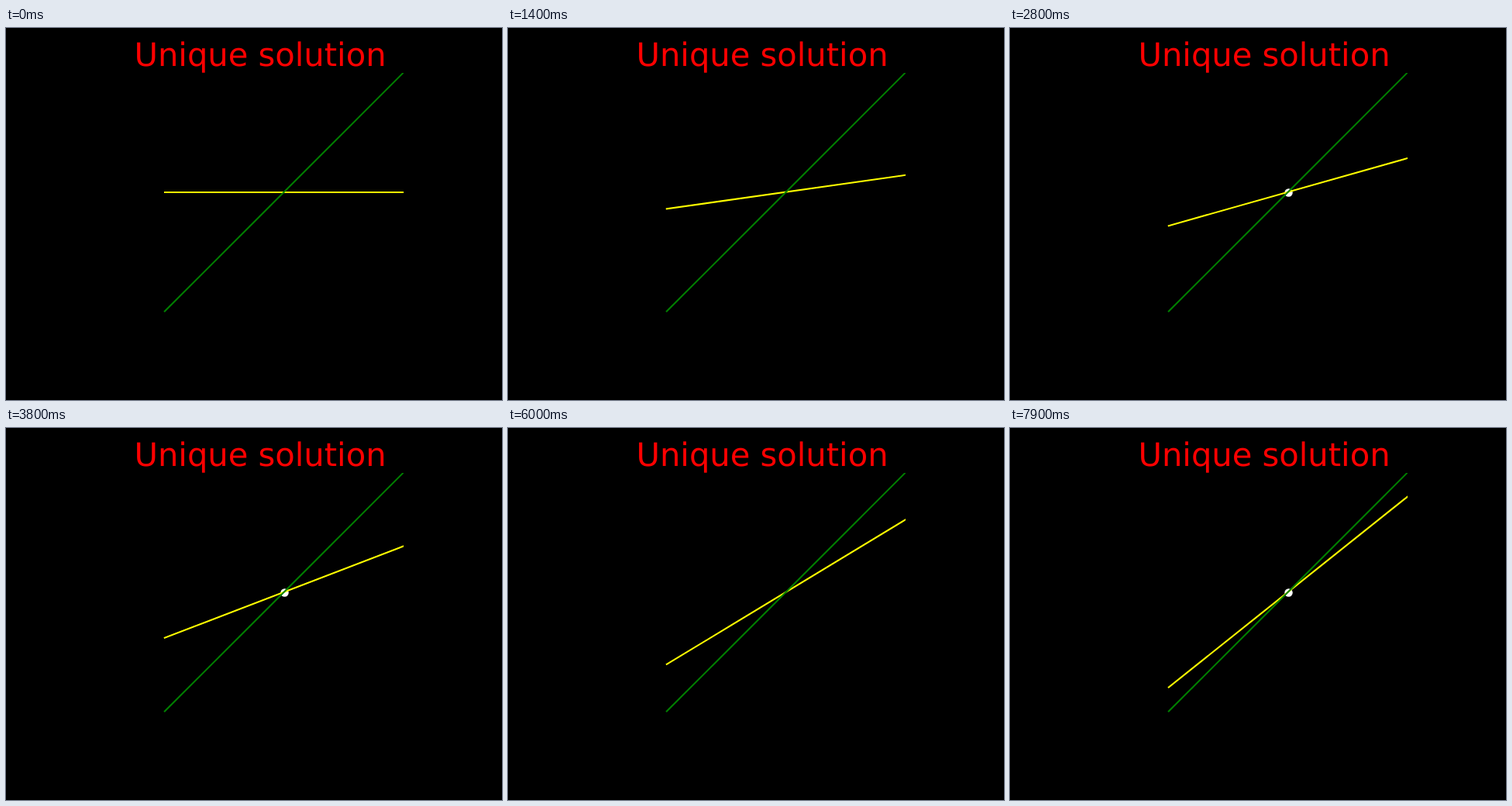
These frames come from a looping animation (640 by 480 pixels, 8000 ms). An HTML page:

```html
<!DOCTYPE html>
<html lang="en">
<head>
<meta charset="utf-8">
<title>Unique solution</title>
<style>
  html, body { margin: 0; width: 100%; height: 100%; overflow: hidden; background: #000; }
  svg { display: block; width: 640px; height: 480px; }
  text { font: 41.667px "DejaVu Sans", sans-serif; fill: #f00; text-anchor: middle; text-rendering: geometricPrecision; }
  line { stroke-width: 2.083; stroke-linecap: square; }
</style>
</head>
<body>
<svg viewBox="0 0 640 480">
  <clipPath id="axes"><rect x="143" y="58" width="370" height="369"/></clipPath>
  <text x="328" y="49">Unique solution</text>
  <g clip-path="url(#axes)">
    <circle id="dot" cx="359.5" cy="212.5" r="5.2" fill="#fff"/>
    <line id="turning" stroke="#ff0"/>
    <line id="fixed" stroke="#008000"/>
  </g>
</svg>
<script>
  const STEP = 100, STEPS = 80, BLINK = 10;
  const CENTER = { x: 358.8, y: 211.6 }, HALF = 154;
  const [dot, turning, fixed] = ["dot", "turning", "fixed"].map(id => document.getElementById(id));

  function setSlope(line, slope) {
    // A level line sits on whole pixels.
    const snap = slope ? v => v : Math.round;
    const x = snap(CENTER.x), y = snap(CENTER.y);
    const ends = {
      x1: x - HALF, y1: y + HALF * slope,
      x2: x + HALF, y2: y - HALF * slope
    };
    for (const name in ends) line.setAttribute(name, ends[name]);
  }

  function draw(time) {
    const k = Math.floor(time / STEP) % STEPS;
    setSlope(turning, k / 99);
    dot.style.visibility = k % BLINK >= BLINK / 2 ? "visible" : "hidden";
  }

  function loop() {
    draw(performance.now() - start);
    requestAnimationFrame(loop);
  }

  const start = performance.now();
  setSlope(fixed, 1);
  loop();
</script>
</body>
</html>
```
